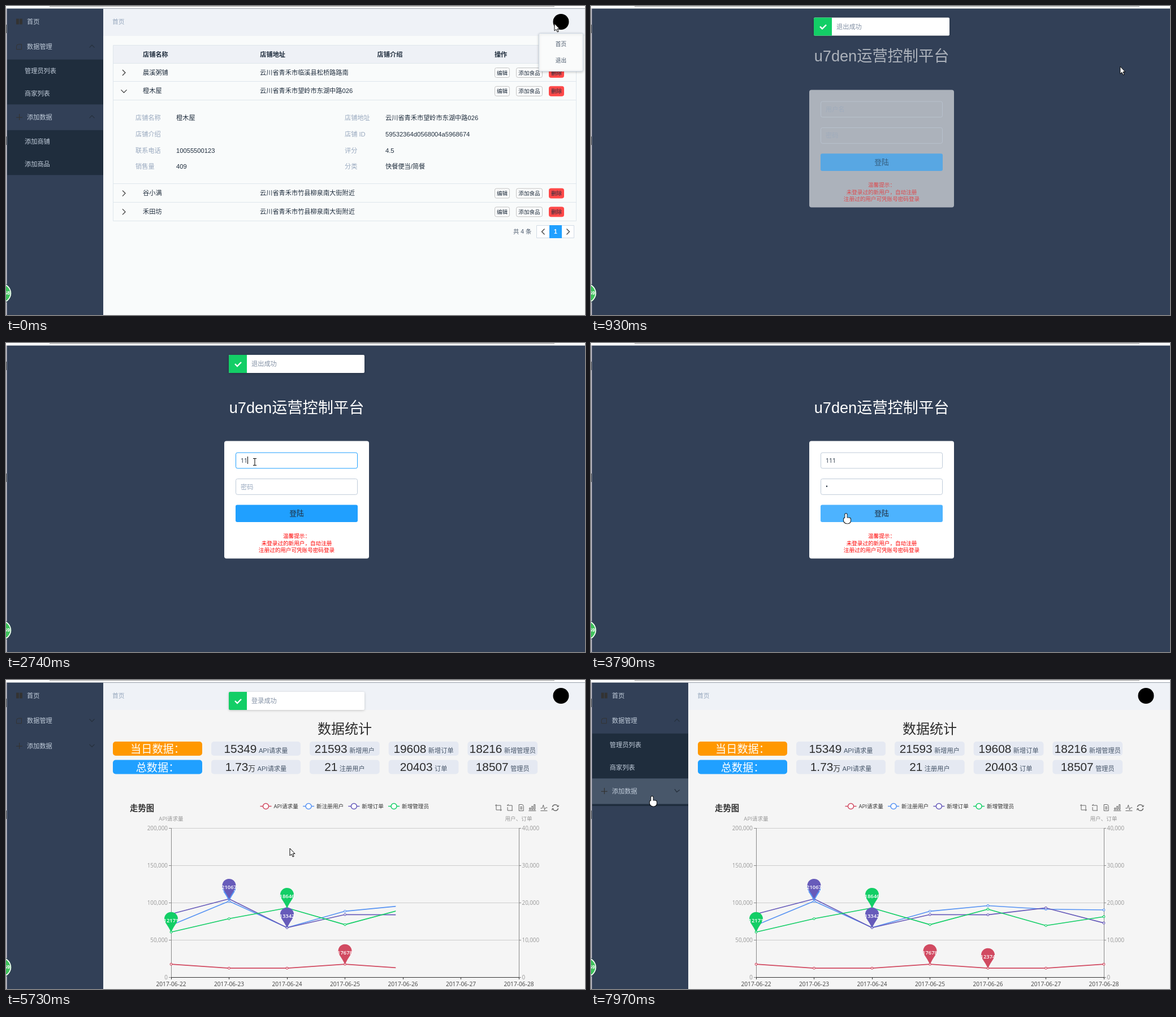
These frames come from a looping animation (1024 px wide and 547 px high, 8 s). An HTML page with a canvas:

```html
<!DOCTYPE html>
<html lang="zh-CN">
<head>
<meta charset="utf-8">
<title>后台</title>
<style>
html, body { margin: 0; width: 100%; height: 100%; overflow: hidden; }
canvas { display: block; }
</style>
</head>
<body>
<canvas id="stage" width="1024" height="547"></canvas>
<script>
const g = document.getElementById('stage').getContext('2d');
const UI = '"Liberation Sans", "Noto Sans CJK SC", sans-serif';
const CHART = '"Open Sans", "Noto Sans CJK SC", sans-serif';
const NAVY = '#324057', INK = '#1f2d3d', BLUE = '#20a0ff', GREEN = '#13ce66', LINE = '#dfe6ec';

// The screen is refreshed at a steady rate
const LOOP = 8000, TICK = 137.4, FIRST = 100;
const LOGIN_AT = 580, HOME_AT = 3940, CHART_AT = 4950;

const clamp = p => Math.max(0, Math.min(1, p));
const smooth = p => p * p * (3 - 2 * p);

// CSS "ease": solve the Bezier's x for p by halving, return its y
function ease(p) {
  p = clamp(p);
  if (p === 0 || p === 1) return p;
  let a = 0, b = 1, m;
  for (let i = 0; i < 20; i++) {
    m = (a + b) / 2;
    .75 * m * (1 - m) + m ** 3 < p ? a = m : b = m;
  }
  return .3 * m * (1 - m) ** 2 + 3 * m * m * (1 - m) + m ** 3;
}

function textWidth(s, size, family = UI) {
  g.font = `${size}px ${family}`;
  return g.measureText(s).width;
}

function text(s, x, y, size, color, align = 'left', weight = 400, family = UI) {
  g.font = `${weight} ${size}px ${family}`;
  g.textAlign = align;
  g.fillStyle = color;
  g.fillText(s, x, y + size * .37);
}

function box(x, y, w, h, fill, r = 0, stroke) {
  g.beginPath();
  if (stroke) g.roundRect(x + .5, y + .5, w - 1, h - 1, r);
  else g.roundRect(x, y, w, h, r);
  if (fill) { g.fillStyle = fill; g.fill(); }
  if (stroke) { g.strokeStyle = stroke; g.lineWidth = 1; g.stroke(); }
}

function path(pts, color, width = 1, fill) {
  g.beginPath();
  pts.forEach(([x, y]) => g.lineTo(x, y));
  if (fill) { g.closePath(); g.fillStyle = fill; g.fill(); }
  g.strokeStyle = color;
  g.lineWidth = width;
  g.stroke();
}

function disc(x, y, r, fill, stroke, width = 1) {
  g.beginPath();
  g.arc(x, y, r, 0, 7);
  g.fillStyle = fill;
  g.fill();
  if (stroke) { g.strokeStyle = stroke; g.lineWidth = width; g.stroke(); }
}

function at(x, y, draw, turn = 0) {
  g.save();
  g.translate(x, y);
  g.rotate(turn);
  draw();
  g.restore();
}

function shadowed(draw) {
  g.save();
  g.shadowColor = 'rgba(0,0,0,.2)';
  g.shadowBlur = 4;
  g.shadowOffsetY = 1;
  draw();
  g.restore();
}

const chevron = (x, y, turn, color = '#333', s = 5) =>
  at(x, y, () => path([[-s, -s / 2], [0, s / 2], [s, -s / 2]], color, 1.2), turn);

// ---------- sidebar and header ----------
function menuIcon(kind, y) {
  const c = '#333';
  if (kind === 0) [18, 24].forEach(x => box(x, y - 5, 5, 10, c));
  else if (kind === 1) box(18, y - 5, 10, 10, null, [4, 0, 0, 0], c);
  else { box(18, y - .5, 11, 1.2, c); box(23, y - 6, 1.2, 11, c); }
}

function sidebar(open1, open2, mouse) {
  const row = 44.8;
  let y = 5;
  box(2, 5, 170, 542, NAVY);
  const group = (kind, label, open, subs) => {
    if (mouse.x < 172 && mouse.y > y && mouse.y < y + row) box(2, y, 170, row, '#48576a');
    menuIcon(kind, y + 22.5);
    text(label, 37, y + 22.5, 11.2, '#c0ccda');
    if (kind) chevron(152, y + 21.5, open * Math.PI, '#26303c', 4.5);
    y += row;
    const h = 40 * subs.length * open;
    g.save();
    g.beginPath();
    g.rect(2, y, 170, h);
    g.clip();
    box(2, y, 170, h, INK);
    subs.forEach((s, i) => text(s, 33, y + 20 + 40 * i, 11.2, '#c0ccda'));
    g.restore();
    y += h;
  };
  group(0, '首页', 0, []);
  group(1, '数据管理', open1, ['管理员列表', '商家列表']);
  group(2, '添加数据', open2, ['添加商铺', '添加商品']);
}

function header() {
  box(172, 5, 852, 48, '#eff2f7');
  text('首页', 188, 28.5, 10.8, '#97a8be');
  disc(981.5, 28, 14, '#000');
}

// ---------- shop list ----------
const shops = [
  ['晨溪粥铺', '云川省青禾市临溪县松桥路路南'],
  ['橙木屋', '云川省青禾市望岭市东湖中路026'],
  ['谷小满', '云川省青禾市竹县柳泉南大街附近'],
  ['禾田坊', '云川省青禾市竹县柳泉南大街附近']
];
const details = [
  ['店铺名称', shops[1][0], '店铺地址', shops[1][1]],
  ['店铺介绍', '', '店铺 ID', '59532364d0568004a5968674'],
  ['联系电话', '10055500123', '评分', '4.5'],
  ['销售量', '409', '分类', '快餐便当/简餐']
];

function button(label, x, y, w, red) {
  box(x, y - 9, w, 18, red ? '#ff4949' : '#fafbfb', 3, red ? '#ff4949' : '#c4c4c4');
  text(label, x + w / 2, y, 9.6, INK, 'center');
}

function listPage(mouse) {
  box(172, 5, 852, 542, '#f9fbfb');
  header();
  sidebar(1, 1, mouse);
  box(189, 69, 820, 312, null, 0, LINE);
  box(190, 70, 818, 31, '#eef1f6');
  ['店铺名称', '店铺地址', '店铺介绍', '操作'].forEach((s, i) =>
    text(s, 242 + 207.3 * i, 85.5, 11.2, INK, 'left', 700));
  shops.forEach(([name, place], i) => {
    const y = 117.5 + 32.8 * i + (i > 1 ? 148 : 0);
    box(189, Math.floor(y - 16.5), 820, 1, LINE);
    chevron(208.5, y + .5, i === 1 ? 0 : -Math.PI / 2);
    text(name, 242, y, 11.2, INK);
    text(place, 449, y, 11.2, INK);
    button('编辑', 864, y + .5, 27);
    button('添加食品', 902, y + .5, 47);
    button('删除', 960, y + .5, 27, true);
  });
  box(189, 166, 820, 1, LINE);
  details.forEach((d, i) => d.forEach((s, k) =>
    text(s, 229 + 370 * (k >> 1) + 72 * (k % 2), 198 + 28.7 * i, 11.2, k % 2 ? INK : '#99a9bf')));

  text('共 4 条', 897, 399.5, 10.4, '#48576a');
  box(938, 388, 67, 23, '#fff', 0, '#d1dbe5');
  box(961, 388, 22, 23, BLUE);
  text('1', 972, 399.5, 10.4, '#fff', 'center', 700);
  chevron(950, 399.5, Math.PI / 2);
  chevron(994, 399.5, -Math.PI / 2);

  shadowed(() => box(942, 48, 79, 68, '#fafbfb', 2, '#d1dbe5'));
  ['首页', '退出'].forEach((s, i) => {
    const y = 53 + 29 * i;
    if (mouse.y > y && mouse.y < y + 29) box(943, y, 77, 29, '#e4e8f1');
    text(s, 981.5, y + 14.5, 9.7, '#48576a', 'center');
  });
}

// ---------- login ----------
const USER = 193.6, PASS = USER + 46.4, SUBMIT = PASS + 46.4, FIELD = 28.8;
const over = (m, y) => m.x > 406 && m.x < 622 && m.y > y - 3 && m.y < y + FIELD;

function field(y, hint, value, focus, caretOn, hover) {
  box(406, y, 216, FIELD, null, 3, focus ? BLUE : hover ? '#8391a5' : '#bfcbd9');
  if (value) text(value, 415, y + 14.6, 10.5, INK, 'left', 400, CHART);
  else text(hint, 415, y + 14.4, 11.2, '#97a8be');
  if (focus && caretOn) box(415 + textWidth(value, 10.5, CHART), y + 7.4, 1, 13, '#000');
}

function loginPage(t, mouse) {
  const shown = ease((t - LOGIN_AT) / 1000);
  const user = '1'.repeat(Math.max(0, Math.min(3, Math.ceil((t - 2560) / TICK))));
  const caretOn = t < 2150 || t > 2560;
  g.save();
  g.globalAlpha = shown;
  g.translate(0, 62 * (shown - 1));
  text('u7den运营控制平台', 514, 113.5, 27.2, '#fff', 'center');
  box(386, 173.6, 256, 208, '#fff', 4);
  field(USER, '用户名', user, t > 1740 && t < 2990, caretOn, over(mouse, USER));
  field(PASS, '密码', t > 3120 ? '•' : '', t > 2990 && t < 3600, caretOn, over(mouse, PASS));
  box(406, SUBMIT, 216, 30.6, over(mouse, SUBMIT) ? '#4db3ff' : BLUE, 3);
  text('登陆', 514, SUBMIT + 15, 12.8, INK, 'center');
  ['温馨提示：', '未登录过的新用户，自动注册', '注册过的用户可凭账号密码登录'].forEach((s, i) =>
    text(s, 514, 341.5 + 12.7 * i, 9.6, '#f00', 'center'));
  g.restore();
}

// ---------- dashboard ----------
// Each cell: number, unit, label
const cells = [
  ['当日数据：', '总数据：'],
  [['15349', '', 'API请求量'], ['1.73', '万', 'API请求量']],
  [['21593', '', '新增用户'], ['21', '', '注册用户']],
  [['19608', '', '新增订单'], ['20403', '', '订单']],
  [['18216', '', '新增管理员'], ['18507', '', '管理员']]
];

function figures(x, y, [num, unit, label], loaded) {
  const runs = [[label, 11.2, '#475669']];
  if (loaded) runs.unshift([num, 20.8, '#2c2c2c'], [unit + ' ', 12.8, '#333']);
  x -= runs.reduce((sum, [s, size]) => sum + textWidth(s, size), 0) / 2;
  runs.forEach(([s, size, color]) => {
    text(s, x, y - size * .37, size, color);
    x += textWidth(s, size);
  });
}

function summary(loaded) {
  let x = 189;
  cells.forEach((column, i) => {
    const w = i < 2 ? 158 : 123.7;
    column.forEach((cell, k) => {
      const y = 109 + 32.5 * k;
      box(x, y, w, 25, i ? '#e5e9f2' : k ? BLUE : '#ff9800', 5);
      if (i) figures(x + w / 2, y + 19.5, cell, loaded);
      else text(cell, x + w / 2, y + 13, 19.2, '#fff', 'center');
    });
    x += w + 16;
  });
}

// Values are shares of the axis; marks are the days with a pin
const days = [...Array(7).keys()];
const thousands = (...v) => i => v[i] * 1000;
const series = [
  { name: 'API请求量', color: '#d14a61', max: 200000, marks: [3, 4],
    value: i => Math.round(14142 + 3536 * Math.cos(i * Math.PI * 2 / 3)) },
  { name: '新注册用户', color: '#5793f3', max: 40000, marks: [1, 2],
    value: thousands(14, 20.45, 13.38, 17.75, 19.25, 18.3, 18.1) },
  { name: '新增订单', color: '#675bba', max: 40000, marks: [1, 2],
    value: thousands(17, 21.067, 13.342, 16.85, 16.8, 18.65, 14.6) },
  { name: '新增管理员', color: GREEN, max: 40000, marks: [0, 2],
    value: thousands(12.171, 15.75, 18.646, 14.15, 18.3, 13.9, 16.3) }
];
const dayX = i => 292 + 102.5 * i;
const point = (s, i) => [dayX(i), 526.5 - 264 * s.value(i) / s.max];
const label = (s, x, y, color, align, size = 9.6) => text(s, x, y, size, color, align, 400, CHART);

function pin(x, y, color, value) {
  g.beginPath();
  g.arc(x, y - 23.5, 12, Math.PI * .85, Math.PI * .15);
  g.quadraticCurveTo(x + 4, y - 8, x, y);
  g.quadraticCurveTo(x - 4, y - 8, x - 10.7, y - 18);
  g.fillStyle = color;
  g.fill();
  text(value, x, y - 21, 9.4, '#fff', 'center', 600, CHART);
}

function toolbox() {
  const c = '#666';
  const icons = [
    () => { path([[-4, -6], [-4, 4], [6, 4]], c); path([[-6, -4], [4, -4], [4, 6]], c); },
    () => { path([[-2, -6], [-5, -4], [4, -4], [4, 5]], c); path([[-4, -1], [-4, 5], [5, 5]], c); },
    () => { box(-4.5, -6, 9, 12, null, [0, 3, 0, 0], c); [-2, 0, 2].forEach(y => box(-2, y, 4, 1, c)); },
    () => { [0, 1, 2].forEach(i => box(4 * i - 6, -3 * i, 3, 4 + 3 * i, null, 0, c)); box(-7, 5, 13, 1, c); },
    () => { path([[-6, 1], [-3, 1], [-1, -5], [1, 4], [3, 0], [6, 0]], c); box(-6, 5, 12, 1, c); },
    () => [0, Math.PI].forEach(turn => at(0, 0, () => {
      g.beginPath();
      g.arc(0, 0, 5.3, -2.9, -.35);
      g.stroke();
      path([[2.5, -2], [5.5, -1.5], [6, -4.5]], c);
    }, turn))
  ];
  g.strokeStyle = c;
  icons.forEach((draw, i) => at(871 + 20.1 * i, 226, draw));
}

function legend() {
  let x = 459.5;
  series.forEach(({ name, color }) => {
    path([[x - 10, 223.5], [x + 10, 223.5]], color, 1.5);
    disc(x, 223.5, 5, '#fff', color, 1.5);
    label(name, x + 14, 223.5, '#333');
    x += 32.3 + textWidth(name, 9.6, CHART);
  });
}

function axes(t) {
  label('API请求量', 292, 245.5, '#999', 'center');
  label('用户、订单', 906.5, 245.5, '#999', 'center');
  for (let i = 0; i < 5; i++) {
    const y = 262 + 66 * i;
    box(292, y, 615, 1, i < 4 ? '#ccc' : '#333');
    [288, 907].forEach(x => box(x, y, 4, 1, '#888'));
    label((200000 - 50000 * i).toLocaleString('en-US'), 286, y + .5, '#999', 'right', 9.9);
    label((40000 - 10000 * i).toLocaleString('en-US'), 912.5, y + .5, '#999', 'left', 9.9);
  }
  days.forEach(i => {
    box(Math.floor(dayX(i)), 526, 1, 4, '#333');
    label('2017-06-' + (22 + i), dayX(i), 538, '#444', 'center', 10.2);
  });
  [0, 6].forEach(i => box(dayX(i), 262, 1, 264, '#888'));
  if (t < 5000) box(394, 262, 1, 264, '#aaa');
}

function chart(t) {
  text('走势图', 219, 227, 14.4, '#333', 'left', 700);
  legend();
  toolbox();
  axes(t);
  if (t < CHART_AT) return;
  const grown = clamp((t - CHART_AT) / 1000);
  const edge = dayX(6 * grown);
  g.save();
  g.beginPath();
  g.rect(280, 250, edge - 280 + (grown === 1 ? 5 : 0), 290);
  g.clip();
  g.lineJoin = 'bevel';
  series.forEach(s => {
    const pts = days.map(i => point(s, i));
    path(pts, s.color, 1.6);
    pts.forEach(([x, y]) => disc(x, y, 1.8, '#fff', s.color, 1.1));
  });
  g.restore();
  series.forEach(s => s.marks.filter(i => dayX(i) <= edge).forEach(i =>
    pin(...point(s, i), s.color, s.value(i))));
}

function homePage(t, mouse) {
  box(172, 5, 852, 542, '#f5f5f5');
  header();
  sidebar(ease((t - 7240) / 300), ease((t - 7912) / 300), mouse);
  text('数据统计', 599, 86, 24, '#2c2c2c', 'center');
  summary(t > 4700);
  chart(t);
}

// ---------- overlays ----------
function message(t, start, s) {
  const close = start + 2570;
  const shown = span => ease((t - start) / span) - ease((t - close) / span);
  g.save();
  g.globalAlpha = shown(300);
  g.translate(0, 32 * (shown(400) - 1));
  shadowed(() => box(394, 21, 240, 32, '#fff', 2));
  box(394, 21, 32, 32, GREEN, [2, 0, 0, 2]);
  path([[405, 37], [409, 41], [416, 34]], '#fff', 2.4);
  text(s, 434, 37, 11.2, '#8391a5');
  g.restore();
}

function windowEdges(t) {
  box(0, 0, 1024, 4.5, '#fff');
  box(77, 0, 893, 1, '#999');
  box(0, 4, 1.5, 543, '#d5d0d8');
  [33, 231].forEach(y => box(0, y, 1, 15, '#555'));
  disc(-8, 508.5, 18, '#2a4f4c');
  disc(-8, 508.5, 17.2, '#fff');
  disc(-8, 508.5, 15.5, '#3fc35c');
  text(t < FIRST ? '58' : '59', 7, 508, 9, '#fff', 'right', 700);
}

// Places the pointer visits: arrival time, x, y; each move takes MOVE ms
const MOVE = 500;
const stops = [[0, 970, 31], [600, 978, 96], [1340, 423, 242], [1770, 440, 210], [3530, 451, 302],
  [4890, 502, 298], [6600, 110, 97], [7230, 112, 68], [7850, 108, 206]];

function pointer(t) {
  let [, x, y] = stops[0];
  stops.slice(1).forEach(([end, x1, y1], i) => {
    const p = smooth(clamp((t - end) / MOVE + 1));
    x += (x1 - stops[i][1]) * p;
    y += (y1 - stops[i][2]) * p;
  });
  return { x, y };
}

const arrow = () => path([[0, 0], [0, 13], [3, 10.3], [5.2, 15], [7.2, 14.2], [5.2, 9.5], [9, 9.5], [0, 0]],
  '#000', 1, '#fff');

function hand() {
  const parts = (grow, color) => {
    box(-1.7 - grow, -grow, 3.4 + 2 * grow, 12, color, 2);
    box(-4 - grow, 7.5 - grow, 12 + 2 * grow, 10 + 2 * grow, color, [3, 3, 5, 6]);
  };
  parts(.8, '#000');
  parts(0, '#fff');
}

function beam() {
  box(-.5, -5, 1, 11, '#000');
  [-6, 6].forEach(y => box(-3, y, 6, 1, '#000'));
}

function cursor(t, m) {
  const link = t < LOGIN_AT ? m.y > 53 : t < HOME_AT ? over(m, SUBMIT) : m.x < 172;
  const input = t >= LOGIN_AT && t < HOME_AT && (over(m, USER) || over(m, PASS));
  at(m.x, m.y, link ? hand : input ? beam : arrow);
}

function draw(now) {
  const t = Math.max(0, FIRST + TICK * Math.floor((now % LOOP - FIRST) / TICK));
  const mouse = pointer(t);
  box(0, 0, 1024, 547, NAVY);
  if (t < LOGIN_AT) listPage(mouse);
  else if (t < HOME_AT) loginPage(t, mouse);
  else homePage(t, mouse);
  message(t, 595, '退出成功');
  message(t, 3925, '登录成功');
  windowEdges(t);
  cursor(t, mouse);
}

const begin = performance.now();
function tick() {
  draw(performance.now() - begin);
  requestAnimationFrame(tick);
}
tick();
</script>
</body>
</html>
```
